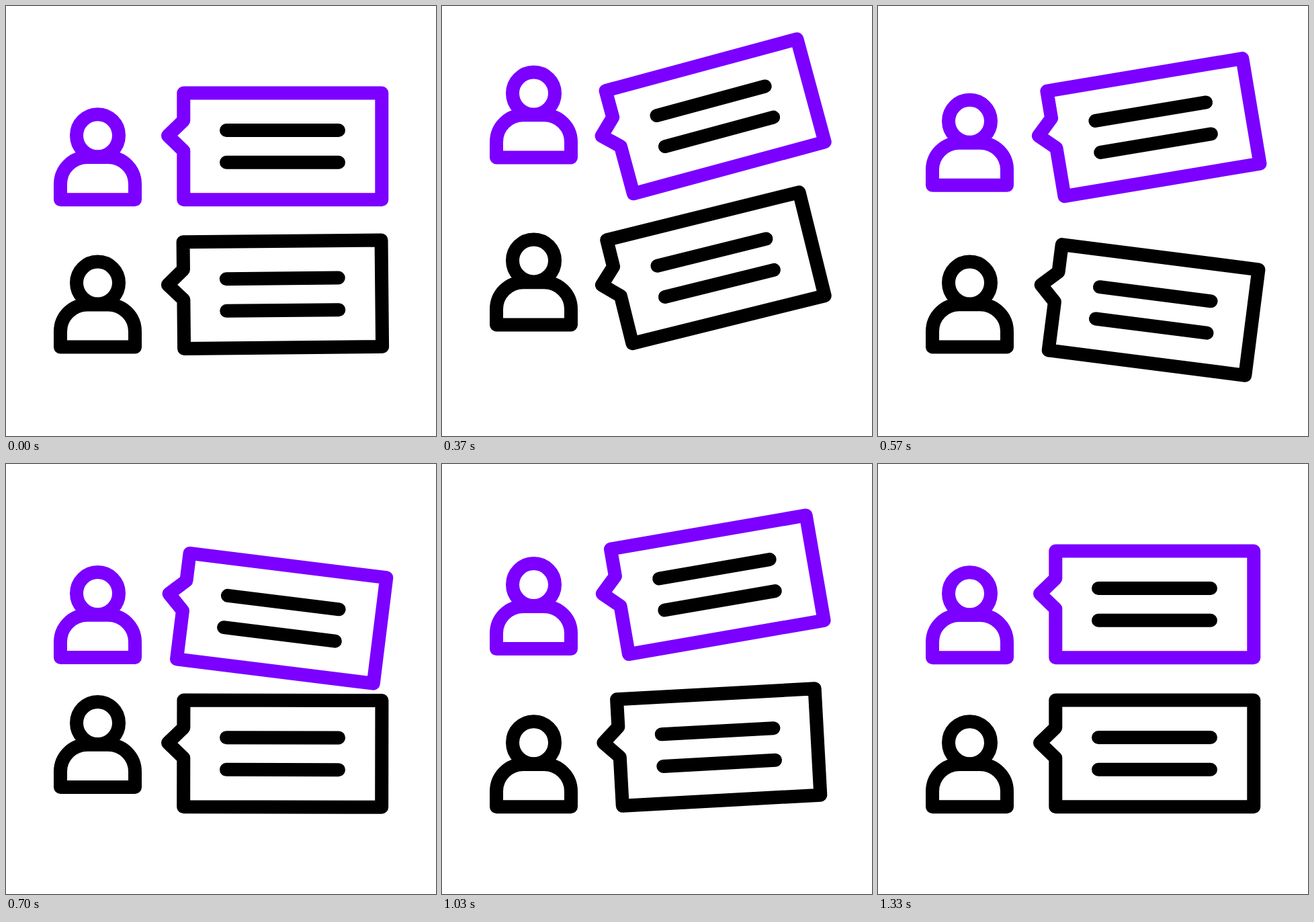
These frames come from a looping animation (640 px wide and 640 px high, 1670 ms). An HTML page:

```html
<!DOCTYPE html>
<html lang="en">
<head>
<meta charset="utf-8">
<title>Chat</title>
<style>
  html, body { margin: 0; width: 100%; height: 100%; overflow: hidden; background: #fff; }
  svg { display: block; width: 100%; height: 100%; }
  g { fill: none; stroke-width: 20; stroke-linecap: round; stroke-linejoin: round; }
</style>
</head>
<body>
<svg viewBox="0 0 640 640">
  <defs>
    <g id="user">
      <circle cx="136.5" cy="192.7" r="31.5"/>
      <path d="M81 288.2V265A40 40 0 0 1 121 225H152A40 40 0 0 1 192 265V288.2Z"/>
    </g>
    <g id="bubble">
      <path d="M264.3 129.5V170.5L241 193L264.3 215.5V288.2H559.3V129.5Z"/>
      <path d="M328 185H495M328 232.7H495" stroke="#000"/>
    </g>
  </defs>
  <g stroke="#7b00ff">
    <use href="#user" class="user"/>
    <use href="#bubble" class="bubble"/>
  </g>
  <g stroke="#000" transform="translate(0 222)">
    <use href="#user" class="user"/>
    <use href="#bubble" class="bubble"/>
  </g>
</svg>
<script>
const LOOP = 1670, LAST = 40;
const LAG = [5, 0];   // the upper row follows the lower one

// [tick, value, ease x1, ease x2], 30 ticks per second
const TILT = [[-1.5, 0], [8.9, -17, .5, .44], [16.65, 7.3], [26.1, -9.8], [34.35, 0]];
const HOP = [[-1.3, 0], [7, -63.5, .5, .35], [15.55, 0], [21.8, -30], [29.7, 0]];

// cubic-bezier(x1, 0, x2, 1)
function ease(t, x1 = .5, x2 = .5) {
  let lo = 0, hi = 1, s = .5;
  for (let i = 0; i < 24; i++) {
    s = (lo + hi) / 2;
    const r = 1 - s;
    const x = 3 * r * r * s * x1 + 3 * r * s * s * x2 + s * s * s;
    if (x < t) lo = s; else hi = s;
  }
  return s * s * (3 - 2 * s);
}

function valueAt(steps, tick) {
  if (tick <= steps[0][0]) return steps[0][1];
  for (let i = 1; i < steps.length; i++) {
    const [from, a] = steps[i - 1], [to, b, x1, x2] = steps[i];
    if (tick < to) return a + (b - a) * ease((tick - from) / (to - from), x1, x2);
  }
  return steps[steps.length - 1][1];
}

const users = document.querySelectorAll('.user');
const bubbles = document.querySelectorAll('.bubble');

function draw(now) {
  const ms = now % LOOP;
  const tick = Math.min(LAST, Math.floor((ms / 10 + .5) * .3));
  LAG.forEach((lag, i) => {
    users[i].setAttribute('transform', `translate(0 ${valueAt(HOP, tick - lag)})`);
    bubbles[i].setAttribute('transform', `rotate(${valueAt(TILT, tick - lag)} 241 206)`);
  });
}

let start;
function loop(now) {
  start ??= now;
  draw(Math.max(0, now - start));
  requestAnimationFrame(loop);
}
draw(0);
requestAnimationFrame(loop);
</script>
</body>
</html>
```
